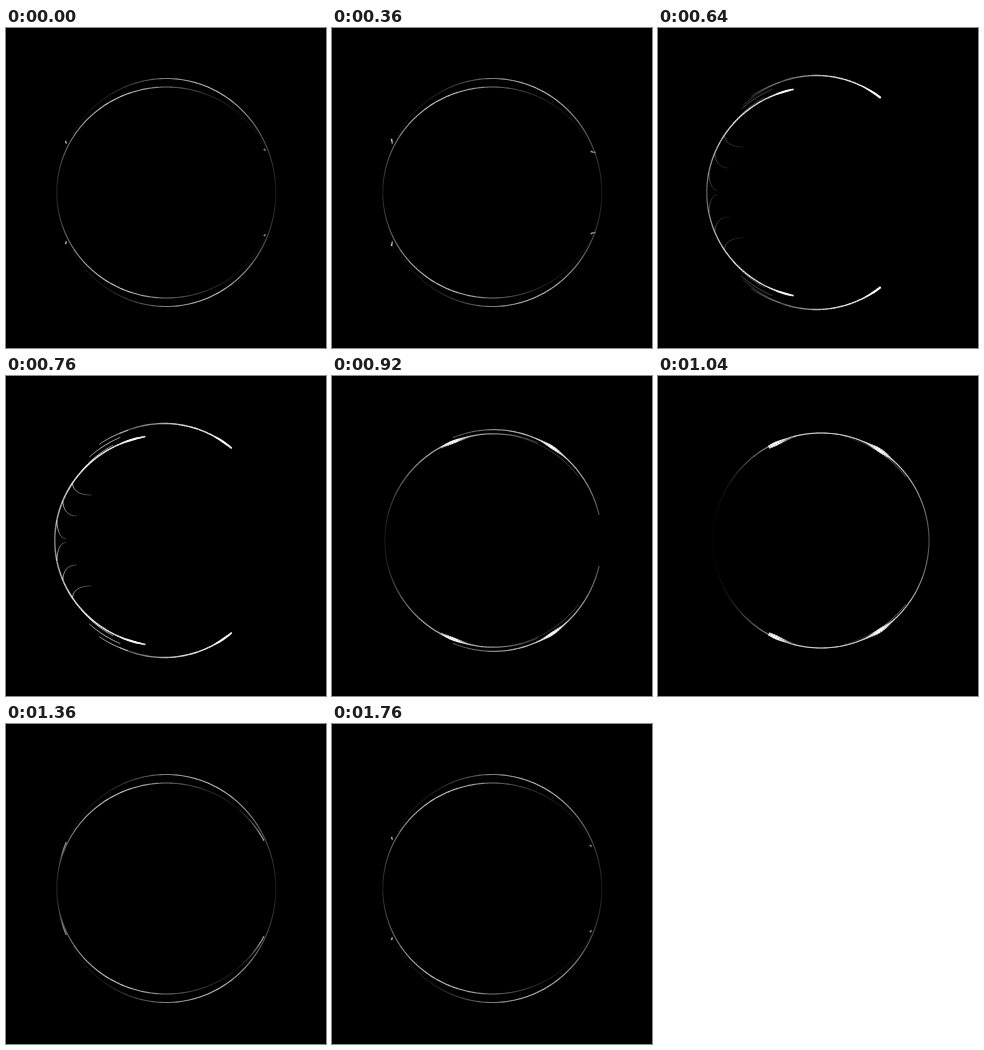
Write an HTML page with a canvas that moves like this. It is 320 px wide and 320 px high and loops after 1800 ms.

```html
<!DOCTYPE html>
<html lang="en">
<head>
<meta charset="utf-8">
<title>Ring of light</title>
<style>
  html, body { margin: 0; width: 100%; height: 100%; overflow: hidden; background: #000; }
  canvas { display: block; width: 100vw; height: 100vh; }
</style>
</head>
<body>
<canvas id="stage" width="320" height="320"></canvas>
<script>
const ctx = document.getElementById('stage').getContext('2d');
const LOOP = 1800, STEP = 40, MID = 164.5, RAD = Math.PI / 180;
const clamp = v => Math.min(1, Math.max(0, v));
const ramp = (t, a, b) => clamp((t - a) / (b - a));
const ease = (t, a, b) => { const u = ramp(t, a, b); return u * u * (3 - 2 * u); };
const pulse = (t, a, b, c, d) => ease(t, a, b) * (1 - ease(t, c, d));
const bell = x => Math.exp(-x * x / 2);

// Strokes point(u) for u in 0..1 with changing light and width
function trace(point, light, width, count) {
  let last = point(0);
  for (let i = 1; i <= count; i++) {
    const u = (i - 0.5) / count, next = point(i / count), alpha = clamp(light(u));
    if (alpha > 0.01) {
      ctx.globalAlpha = alpha;
      ctx.lineWidth = width(u);
      ctx.beginPath();
      ctx.moveTo(...last);
      ctx.lineTo(...next);
      ctx.stroke();
    }
    last = next;
  }
}

const onOval = ({ cx, rx, ry }, deg) =>
  [cx + rx * Math.cos(deg * RAD), MID - ry * Math.sin(deg * RAD)];

function arc(oval, { from, to, peak, spread, alpha, base = 0, width = 1, taper = false }) {
  if (to <= from) return;
  const angle = u => from + (to - from) * u;
  const glow = u => bell((angle(u) - peak) / spread);
  trace(u => onOval(oval, angle(u)), u => alpha * glow(u) + base,
    u => taper ? width * glow(u) : width, Math.ceil((to - from) / 1.5) + 2);
}

function curl([x, y], drop, reach, alpha, width = 1) {
  trace(u => [x + 2 * u + reach * u * u, y + drop * (2 * u - u * u)],
    u => alpha * (1 - 0.7 * u), () => width, 12);
}

// Trails that sweep across the globe from right to left
function streaks(t) {
  const head = Math.PI * ease(t, 380, 505), tail = Math.PI * ramp(t, 430, 620);
  if (head <= tail) return;
  for (let i = 0; i < 14; i++) {
    const height = 118 * Math.sin((i * 6.2 - 7) * RAD);
    const lift = 15 + 20 * bell((height + 14) / 14) - 8 * (height / 106) ** 4;
    const reach = 109 * Math.sqrt(1 - (height / 118) ** 2);
    const alpha = 0.65 + 0.25 * Math.sin(i * 2.4);
    const turn = u => head + (tail - head) * u;
    trace(u => [159 + reach * Math.cos(turn(u)), MID - height - lift * Math.sin(turn(u))],
      u => alpha * (1 - u) ** 2, () => 1.1, 40);
  }
}

// Short curls and slivers left behind on the left side
function remnants(t, oval) {
  const alpha = 0.7 * pulse(t, 560, 740, 780, 920);
  for (let i = 0; i < 3; i++) {
    curl(onOval(oval, 147 + 11 * i), 12 + 3 * i, 17 - 5 * i, alpha);
    const to = 140 - 8 * i, size = 108 + 4 * i;
    arc({ cx: 158, rx: size, ry: size }, { from: 118 - 5 * i, to, peak: to - 10, spread: 12, alpha });
  }
}

// Bright ends that shrink to ticks, then curl before the next sweep
function tips(t, outer, inner) {
  const on = t < 400 ? 1 - ramp(t, 370, 420) : ramp(t, 1120, 1300);
  const left = t < 400 ? 0 : 1 - ease(t, 1280, 1740);
  const wake = t < 400 ? ramp(t, 0, 360) : 0;
  const trail = on * Math.min(1, left * 4);
  const tick = on * (1 - Math.min(1, left * 4));
  arc(outer, { from: 156, to: 157 + 15 * left, peak: 156, spread: 6, alpha: 0.65 * trail, width: 1.2 });
  arc(inner, { from: 27, to: 28 + 22 * left, peak: 27, spread: 9, alpha: 0.65 * trail, width: 1.2 });
  curl([59.5, 113 - 2 * wake], 3 + 2 * wake, -1, tick, 1.4);
  curl([258 + wake, 121 + 2 * wake], 1.5, 3 * wake, tick, 1.4);
}

function half(t) {
  const open = pulse(t, 380, 520, 760, 1000);
  const settle = pulse(t, 520, 760, 780, 1000);
  const flat = pulse(t, 760, 1040, 1040, 1280);
  const rest = 1 - Math.max(open, flat);

  const cx = 160.3 - 2 * open + 2.7 * flat, rx = 109.5 - 1.5 * flat;
  const outer = { cx, rx, ry: 114 + 3 * open - 6.5 * flat };
  const inner = { cx, rx, ry: 105.5 + 2 * flat };
  const outerFrom = 56 * open - 4 * settle;
  const innerFrom = 26 + 78 * open - 4 * settle + 34 * flat;

  arc(outer, {
    from: outerFrom, to: 150 - 36 * settle - 45 * flat,
    peak: 64 + 4 * open - 8 * flat, spread: 28, alpha: 0.9 - 0.2 * rest - 0.2 * flat,
    base: 0.05 + 0.17 * flat, width: 1.1 + 0.3 * open
  });
  arc(inner, {
    from: innerFrom, to: 180,
    peak: 121 + 8 * open - 17 * flat, spread: 28 + 14 * settle - 6 * flat,
    alpha: 0.9 - 0.15 * rest - 0.2 * flat, base: 0.05 - 0.03 * flat, width: 1.1 + 0.4 * settle
  });

  const flare = pulse(t, 440, 640, 1060, 1220);
  const blob = { spread: 6, alpha: flare, width: 2.2 + 1.8 * flat, taper: true };
  const innerPeak = 107 + 8 * flat;
  arc(outer, { ...blob, from: Math.max(outerFrom, 42), to: 72, peak: 57 });
  arc({ ...inner, ry: inner.ry - flat }, {
    ...blob, from: Math.max(innerFrom, innerPeak - 14), to: innerPeak + 12 - 8 * flat, peak: innerPeak
  });
  arc({ cx, rx: rx - 2, ry: 106 }, { from: 37, to: 78, peak: 48, spread: 16, alpha: 0.4 * flat });

  streaks(t);
  remnants(t, inner);
  tips(t, outer, inner);
}

function draw(t) {
  ctx.globalAlpha = 1;
  ctx.fillStyle = '#000';
  ctx.fillRect(0, 0, 320, 320);
  ctx.strokeStyle = '#fff';
  half(t);
  ctx.save();
  ctx.translate(0, 2 * MID);
  ctx.scale(1, -1);
  half(t);
  ctx.restore();
}

const start = performance.now();
function tick() {
  const t = (performance.now() - start) % LOOP;
  draw(Math.floor(t / STEP) * STEP);
  requestAnimationFrame(tick);
}
tick();
</script>
</body>
</html>
```
